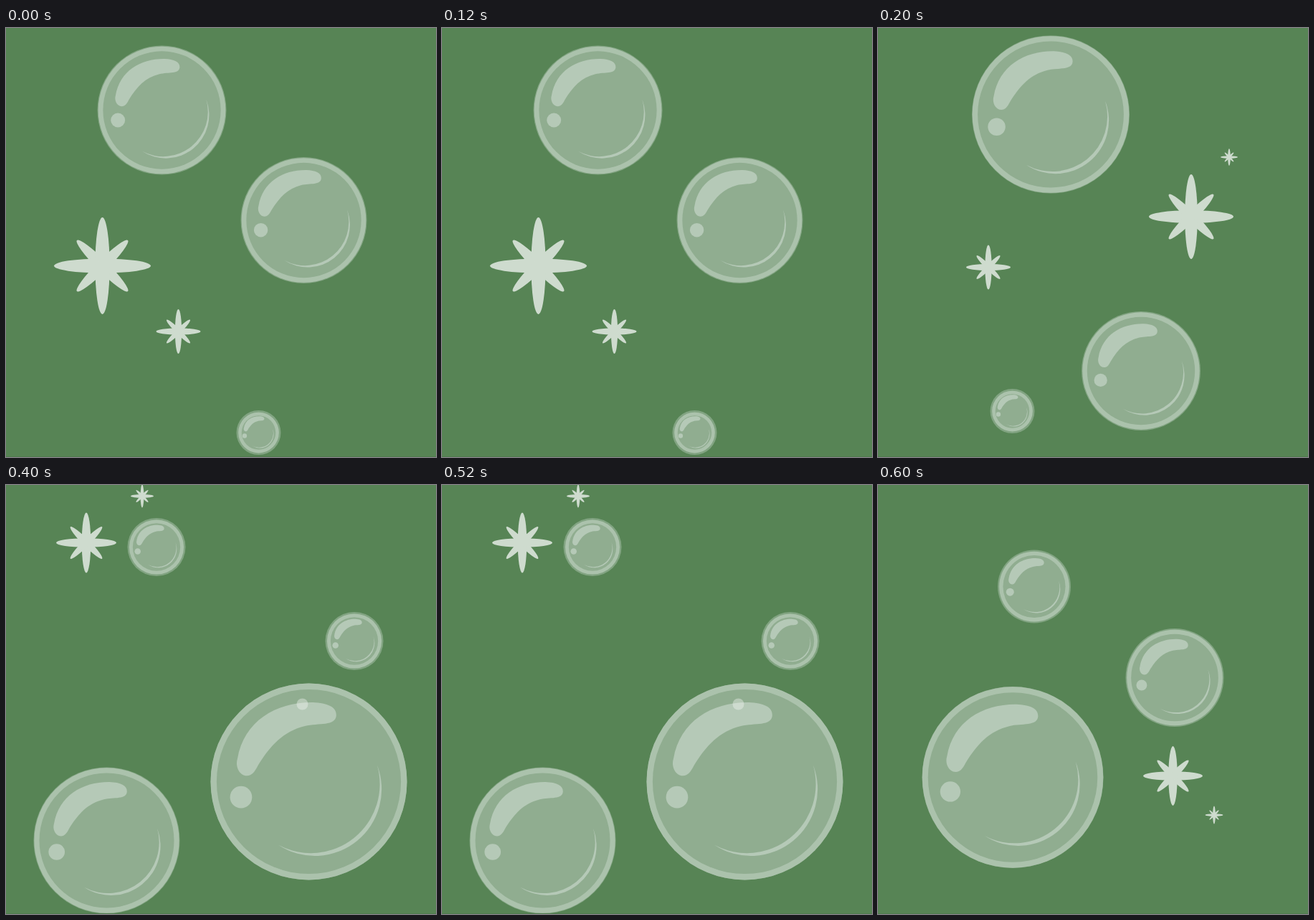
Animation of 600 by 598 pixels, one loop 800 ms. Source, as an HTML page:

```html
<!DOCTYPE html>
<html lang="en">
<head>
<meta charset="utf-8">
<title>Bubbles and sparkles</title>
<style>
html, body { margin: 0; width: 100%; height: 100%; overflow: hidden; background: #578455; }
svg { display: block; width: 100%; height: 100%; }
</style>
</head>
<body>
<svg viewBox="0 0 600 598" xmlns="http://www.w3.org/2000/svg">
  <defs>
    <g id="shine" fill="#b5c9b7">
      <path d="M-63-6C-71-6-75-16-72.700-23C-66-62-33-81 4-80.600C19-80 28.300-76 28-67.500C27.300-56 10-60-4-56.500C-26-51-39-37-52-16C-55-10-58-6-63-6Z"/>
      <circle cx="-69" cy="15.800" r="11.200"/>
      <path d="M-31 64.500A68 68 0 0 0 69.600-17A70.300 70.300 0 0 1-31 64.500Z"/>
    </g>
    <g id="star" fill="#cedbce"></g>
  </defs>
  <rect width="600" height="598" fill="#578455"/>
  <g id="scene"></g>
  <rect y="597" width="600" height="1" fill="#4f7a4e"/>
</svg>
<script>
const HOLD = 200;

// Each item is x, y, radius.
const poses = [
  {
    bubbles: [[217.5, 114.5, 90], [415.5, 268, 88], [352.5, 564, 31]],
    stars: [[134.5, 331.5, 67.5], [240.5, 423, 31]]
  },
  {
    bubbles: [[241, 120.5, 110], [367, 478, 83], [187.5, 534, 31]],
    stars: [[437, 263, 59], [154, 333.5, 31], [490, 180, 12]]
  },
  {
    bubbles: [[210, 86.5, 40.5], [486, 217.5, 40.5], [422.5, 413.5, 137], [140.5, 495.5, 102]],
    stars: [[112, 80.5, 42], [190, 15.5, 16]],
    glint: [413.5, 305.5, 8]
  },
  {
    bubbles: [[218, 141.5, 51], [414, 268.5, 68.5], [188, 407.5, 126.5]],
    stars: [[411.5, 405.5, 41.5], [469, 460, 12.5]]
  }
];

const disc = (x, y, r, fill) => `<circle cx="${x}" cy="${y}" r="${r}" fill="${fill}"/>`;
const stamp = (id, x, y, r) =>
  `<use href="#${id}" transform="translate(${x} ${y}) scale(${r / 100})"/>`;
const petal = (angle, length, width) =>
  `<ellipse rx="${length}" ry="${width}" transform="rotate(${angle})"/>`;

// The faint rim thins and the bright ring thickens as a bubble grows.
function bubble([x, y, r]) {
  const body = r - Math.max(0, 3.4 - r / 40);
  const ring = 3.5 + r / 28;
  return disc(x, y, r, "#82a482") + disc(x, y, body, "#abc2ac") +
    disc(x, y, body - ring, "#90ad90") + stamp("shine", x, y, body);
}

function draw({ bubbles, stars, glint }) {
  let out = bubbles.map(bubble).join("");
  out += stars.map(s => stamp("star", ...s)).join("");
  if (glint) out += disc(...glint, "rgba(255,255,255,.34)");
  return out;
}

let petals = "";
for (let angle = 0; angle < 180; angle += 90) {
  petals += petal(angle, 100, 15) + petal(angle + 45, 74.5, 11.5);
}
document.getElementById("star").innerHTML = petals;

const scene = document.getElementById("scene");
const start = performance.now();
let shown = -1;

function update(now) {
  const i = Math.floor(Math.max(0, now - start) / HOLD) % poses.length;
  if (i !== shown) {
    scene.innerHTML = draw(poses[i]);
    shown = i;
  }
  requestAnimationFrame(update);
}
update(start);
</script>
</body>
</html>
```
